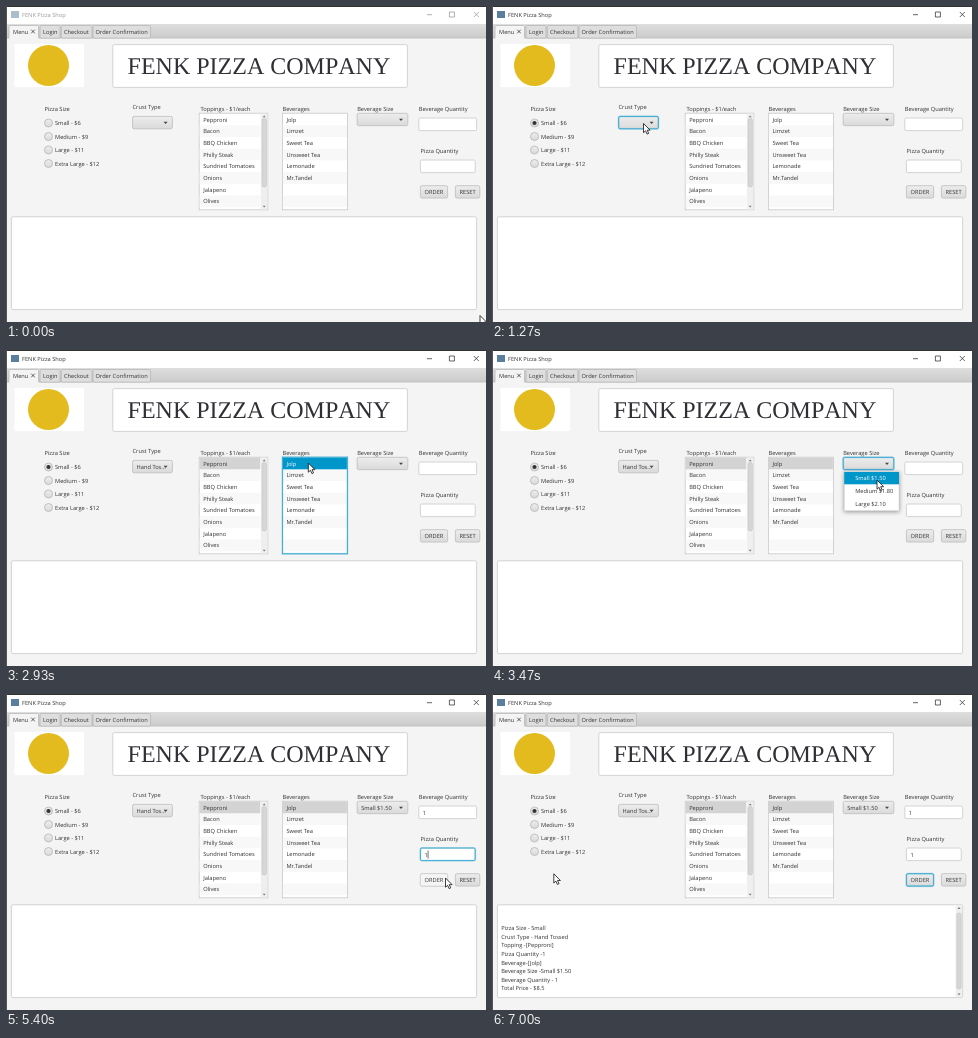
Animation of 480x316 px, one loop 7190 ms. Source, as an HTML page:

```html
<!DOCTYPE html>
<html lang="en">
<head>
<meta charset="utf-8">
<title>Pizza order form</title>
<style>
  html, body { margin: 0; width: 100%; height: 100%; overflow: hidden; background: #f4f4f4; }
  svg { display: block; width: 480px; height: 316px; }
  text { font: 5.7px "Open Sans", "Noto Sans", sans-serif; fill: #333; white-space: pre; text-rendering: geometricPrecision; }
  .brand { font: 24px "Liberation Serif", serif; font-kerning: none; fill: #2f2f35; }
  .mid { text-anchor: middle; }
  .lit { fill: #fff; }
  .box { fill: #fff; stroke: #c9c9c9; stroke-width: .8; }
  .button { fill: url(#metal); stroke: #bdbdbd; stroke-width: .8; }
  .hover { fill: #f5f5f5; stroke: #d0d0d0; stroke-width: .8; }
  .focus { fill: none; stroke: #2fabd8; stroke-width: .9; }
  .glow { fill: none; stroke: #2fabd8; stroke-opacity: .18; stroke-width: 2.2; }
  .popup { fill: #fff; stroke: #c9c9c9; stroke-width: .5; filter: drop-shadow(0 1px 2px rgba(0, 0, 0, .4)); }
  .line { fill: none; stroke: #222; stroke-width: .7; }
</style>
</head>
<body>
<svg id="stage" viewBox="0 0 480 316">
  <defs>
    <linearGradient id="metal" x2="0" y2="1">
      <stop stop-color="#ededed"/><stop offset="1" stop-color="#dadada"/>
    </linearGradient>
    <linearGradient id="strip" x2="0" y2="1">
      <stop stop-color="#dedede"/><stop offset="1" stop-color="#cbcbcb"/>
    </linearGradient>
  </defs>
  <g id="form"></g>
  <g id="arrow">
    <path d="M0 0V9.2L2.1 7.3L3.6 10.6L5.2 9.9L3.7 6.7H6.6Z" fill="#fff" stroke="#111" stroke-width=".8"/>
  </g>
  <g id="beam">
    <path class="line" d="M-1.5 -4.5H1.5M0 -4.5V4.5M-1.5 4.5H1.5"/>
  </g>
</svg>
<script>
const LOOP = 7190, STEP = 1000 / 15;

// When each interaction happens, in ms
const at = {
  radio: 660, crust: 1200, crustOpen: 1330, crustPick: 1460, topping: 2190,
  drink: 2790, size: 3190, sizeOpen: 3260, sizePick: 3720, drinkQty: 3990,
  drinkKey: 4790, pizzaQty: 4990, pizzaKey: 5190, order: 5660, end: LOOP
};

// Pointer path: time, x, y
const path = [
  [0, 474, 309.5], [70, 474, 309.5], [600, 42, 117], [800, 42, 117],
  [1200, 151.5, 117.5], [1320, 151.5, 117.5], [1430, 151, 132], [1730, 152, 134],
  [2130, 209, 114.5], [2400, 209, 114.5], [2730, 288, 113], [2870, 288, 113],
  [3130, 384, 113], [3270, 384, 114], [3460, 385, 130], [3740, 385, 130],
  [3930, 438, 118], [4200, 438, 118], [4530, 445, 172], [4730, 444, 176], [4800, 444, 176],
  [4960, 441, 161], [5200, 441, 161], [5390, 439.5, 184], [5730, 439.5, 184],
  [6200, 330, 222], [6400, 215, 241], [6800, 60.5, 179.5], [6930, 60.5, 179.5], [7000, 61.8, 179.8]
];

const rect = (x, y, w, h, attrs) => `<rect x="${x}" y="${y}" width="${w}" height="${h}" ${attrs}/>`;
const fill = (x, y, w, h, color) => rect(x, y, w, h, `fill="${color}"`);
const shape = (x, y, w, h, name, r = 1.5) => rect(x, y, w, h, `class="${name}" rx="${r}"`);
const text = (x, y, str, name = "") => `<text x="${x}" y="${y + 2.1}" class="${name}">${str}</text>`;
const during = (from, to, body) => `<g data-from="${from}" data-to="${to}">${body}</g>`;
const focus = (x, y, w, h, r = 1.5) => shape(x, y, w, h, "glow", r) + shape(x, y, w, h, "focus", r);

function titleBar() {
  const content = fill(5, 5, 8, 7, "#5a7f9c") + text(16, 9, "FENK Pizza Shop") +
    `<path class="line" d="M421 8.7h5M443.4 6h5v5h-5zM467.8 6l5 5M472.8 6l-5 5"/>`;
  // The window is inactive until the first click
  return fill(0, 0, 480, 18, "#fff") +
    during(0, at.radio, `<g opacity=".5">${content}</g>`) + during(at.radio, at.end, content);
}

function tabs() {
  const tab = (x, w, label, tx, top) =>
    rect(x, 19.5, w, 12.6, `fill="${top}" stroke="#b4b4b4" stroke-width=".7" rx="1"`) + text(tx, 25.6, label);
  return fill(0, 18, 480, 14, "url(#strip)") + fill(0, 31.6, 480, .8, "#b8b8b8") +
    tab(3, 29.5, "Menu", 7, "#f4f4f4") + fill(3.4, 31, 28.8, 2, "#f4f4f4") +
    `<path class="line" d="M25.2 23.7l3.6 3.6M28.8 23.7l-3.6 3.6"/>` +
    tab(34, 20, "Login", 37, "#dedede") + tab(55.3, 30.7, "Checkout", 58, "#dedede") +
    tab(87, 57.5, "Order Confirmation", 89.5, "#dedede");
}

function radios() {
  return ["Small - $6", "Medium - $9", "Large - $11", "Extra Large - $12"].map((label, i) => {
    const y = 117 + i * 13.5;
    return `<circle cx="42.5" cy="${y}" r="4" fill="url(#metal)" stroke="#b5b5b5" stroke-width=".8"/>` + text(49, y, label);
  }).join("") +
    during(at.radio, at.crust, `<circle cx="42.5" cy="117" r="4" class="focus"/>`) +
    during(at.radio, at.end, `<circle cx="42.5" cy="117" r="2.1" fill="#333"/>`);
}

function scrollBar(x, top, bottom, thumbTop, thumbBottom) {
  return fill(x, top, 6.6, bottom - top, "#efefef") +
    rect(x + 1.2, thumbTop, 4.4, thumbBottom - thumbTop, `rx="2" fill="#d6d6d6" stroke="#bdbdbd" stroke-width=".5"`) +
    `<path d="M${x + 1.9} ${top + 3.6}l1.5 -1.8l1.5 1.8zM${x + 1.9} ${bottom - 3.6}l1.5 1.8l1.5 -1.8z" fill="#777"/>`;
}

function list(x, w, items, bar, picked, blurred) {
  const inner = w - (bar ? 7 : 0), row = 11.7, top = 107.6;
  let out = shape(x, 107.2, w, 96.6, "box", 0);
  for (let i = 1; i < 8; i += 2) out += fill(x + .5, top + i * row, inner - 1, row, "#f8f8f8");
  items.forEach((s, i) => out += text(x + 4, 113.7 + i * 11.65, s));
  if (bar) out += scrollBar(x + inner, top, 203.4, 112.5, 181);
  const pick = (color, name) => fill(x + .5, top, inner - 1, row, color) + text(x + 4, 113.7, items[0], name);
  return out + during(picked, blurred, pick("#0096c9", "lit") + focus(x, 107.2, w, 96.6, 0)) +
    during(blurred, at.end, pick("#d3d3d3"));
}

function combo(x, y, w, value, focused, picked, blurred) {
  const ax = x + w - 8.8, ay = y + 5.4;
  return shape(x, y, w, 12.4, "button") +
    `<path d="M${ax} ${ay}h4l-2 2.2z" fill="#444"/>` +
    during(picked, at.end, text(x + 4, y + 6.4, value)) +
    during(focused, blurred, focus(x, y, w, 12.4));
}

function popup(x, y, w, items, from, to, hoverAt) {
  const row = 12.7;
  return during(from, to, shape(x, y, w, 39.2, "popup", 0) +
    items.map((s, i) => text(x + 11, y + 6.7 + i * row, s)).join("") +
    during(hoverAt, to, fill(x, y + .4, w, row - .4, "#0096c9") + text(x + 11, y + 6.7, items[0], "lit")));
}

function field(x, y, w, focused, typed, blurred) {
  const caret = (from, to, dx) => during(from, to, fill(x + dx, y + 2.6, .7, 8, "#333"));
  return shape(x, y, w, 12.6, "box") + during(focused, blurred, focus(x, y, w, 12.6)) +
    during(typed, at.end, text(x + 4, y + 6.6, "1")) +
    caret(focused, Math.min(typed, focused + 260), 3.8) +
    caret(Math.min(typed, focused + 500), typed, 3.8) + caret(typed, blurred, 7.3);
}

function receipt() {
  const lines = ["Pizza Size - Small", "Crust Type - Hand Tossed", "Topping -[Pepproni]", "Pizza Quantity -1",
    "Beverage-[Jolp]", "Beverage Size -Small $1.50", "Beverage Quantity - 1", "Total Price - $8.5"];
  return shape(5.4, 210.8, 465.2, 92.8, "box") + during(at.order, at.end,
    lines.map((s, i) => text(9.2, 234.2 + i * 8.58, s)).join("") +
    scrollBar(463.6, 211.3, 303.1, 219, 295));
}

function buttons() {
  return shape(414.4, 179.7, 27.2, 12.4, "button") +
    during(5330, 5930, shape(414.4, 179.7, 27.2, 12.4, "hover")) +
    during(at.order, at.end, focus(414.4, 179.7, 27.2, 12.4)) + text(428, 186, "ORDER", "mid") +
    shape(449.4, 179.7, 24.4, 12.4, "button") + text(461.6, 186, "RESET", "mid");
}

document.getElementById("form").innerHTML = [
  fill(0, 0, 480, 316, "#f4f4f4"), titleBar(), tabs(),
  fill(0, 0, 480, 1, "#333"), fill(0, 0, 1, 316, "#555"),
  fill(8.5, 38, 69.5, 43, "#fff"), `<circle cx="42.5" cy="59.5" r="20.5" fill="#e3bb1e"/>`,
  shape(106.8, 38.6, 294.6, 42.8, "box"), text(121.6, 65.9, "FENK PIZZA COMPANY", "brand"),
  text(38.5, 103.2, "Pizza Size"), text(126.5, 100.6, "Crust Type"), text(194.5, 103, "Toppings - $1/each"),
  text(276.5, 103, "Beverages"), text(351.2, 103, "Beverage Size"), text(412.8, 102.8, "Beverage Quantity"),
  text(414.6, 145, "Pizza Quantity"),
  radios(),
  combo(126.6, 110.4, 39.8, "Hand Tos...", at.crust, at.crustPick, at.topping),
  list(193.2, 68.6, ["Pepproni", "Bacon", "BBQ Chicken", "Philly Steak", "Sundried Tomatoes", "Onions", "Jalapeno", "Olives"],
    true, at.topping, at.drink),
  list(276.4, 65, ["Jolp", "Limzet", "Sweet Tea", "Unsweet Tea", "Lemonade", "Mr.Tandel"], false, at.drink, at.size),
  combo(351.2, 107.3, 50.6, "Small $1.50", at.size, at.sizePick, at.drinkQty),
  field(412.8, 112, 57.8, at.drinkQty, at.drinkKey, at.pizzaQty),
  field(414.4, 154, 54.8, at.pizzaQty, at.pizzaKey, at.order),
  buttons(), receipt(),
  popup(127.2, 124.4, 50, ["Hand Tossed", "Thin Crust", "Deep Dish"], at.crustOpen, at.crustPick, 1390),
  popup(352.2, 121.6, 54.8, ["Small $1.50", "Medium $1.80", "Large $2.10"], at.sizeOpen, at.sizePick, 3390)
].join("");

const spans = [...document.querySelectorAll("[data-from]")];
const arrow = document.getElementById("arrow"), beam = document.getElementById("beam");

function pointer(t) {
  const i = path.findIndex(p => p[0] > t);
  if (i < 0) return path[path.length - 1].slice(1);
  const [t0, x0, y0] = path[i - 1], [t1, x1, y1] = path[i];
  const u = (t - t0) / (t1 - t0), e = u * u * (3 - 2 * u);
  return [x0 + (x1 - x0) * e, y0 + (y1 - y0) * e];
}

const inside = (x, y, l, t, r, b) => x > l && x < r && y > t && y < b;
const show = (el, on) => { el.style.display = on ? "" : "none"; };

function draw() {
  const t = Math.floor((performance.now() % LOOP + 5) / STEP) * STEP;
  for (const el of spans) show(el, t >= +el.dataset.from && t < +el.dataset.to);
  const [x, y] = pointer(t);
  const typing = inside(x, y, 413, 112, 471, 125) || inside(x, y, 414, 154, 469, 167) || inside(x, y, 5, 211, 464, 304);
  show(arrow, !typing);
  show(beam, typing);
  (typing ? beam : arrow).setAttribute("transform", `translate(${x} ${y})`);
  requestAnimationFrame(draw);
}
draw();
</script>
</body>
</html>
```
